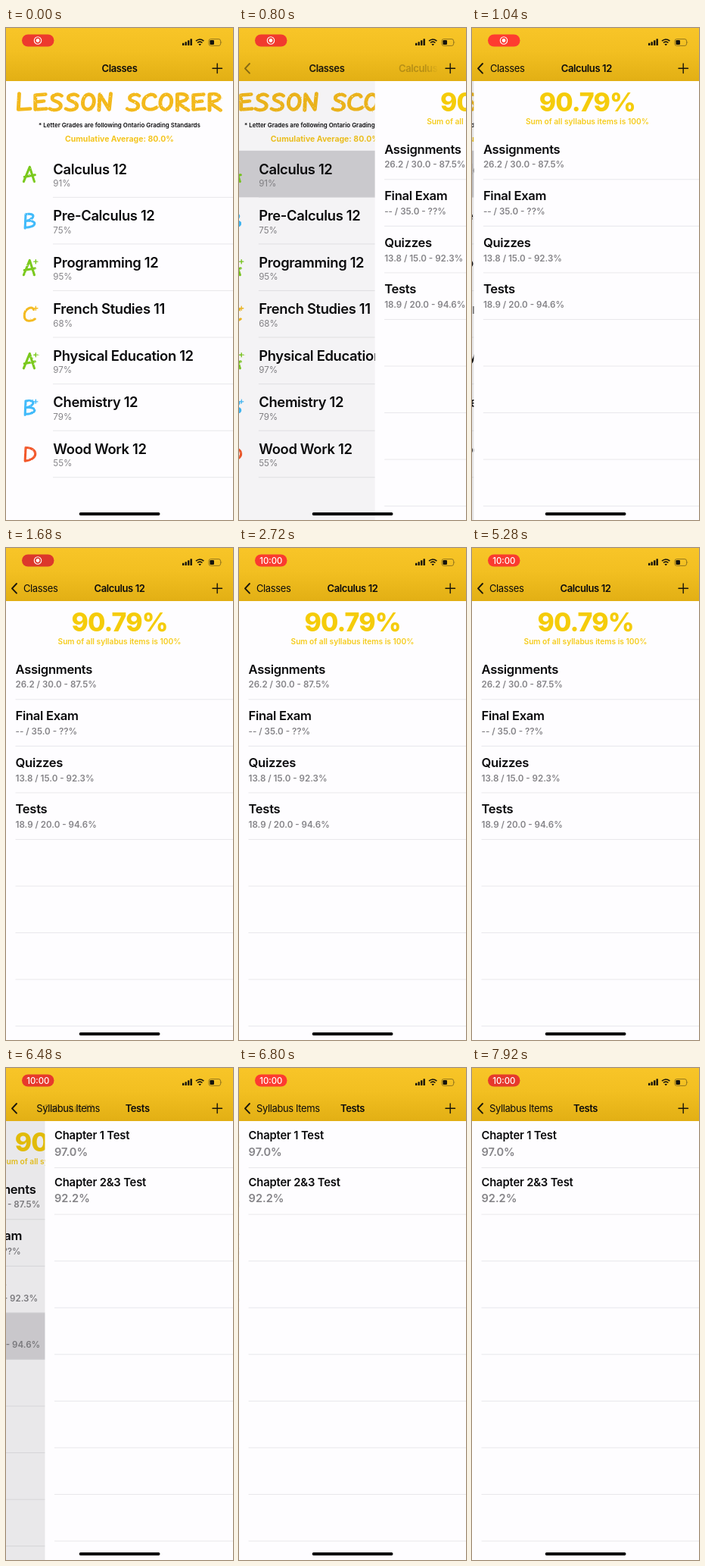
Animation, 300 px wide and 649 px high, one loop 8000 ms. Source, as an HTML page:

```html
<!DOCTYPE html>
<html lang="en">
<head>
<meta charset="utf-8">
<title>Classes</title>
<style>
html, body { margin: 0; width: 100%; height: 100%; overflow: hidden; background: #fefdff; }
svg { display: block; width: 100vw; height: 100vh; }
text { font-family: Inter, "Open Sans", sans-serif; fill: #0b0b0d; white-space: pre; }
.mid { text-anchor: middle; }
.nav { font-size: 13px; letter-spacing: -.03em; }
.bold { font-weight: 600; }
.class { font-size: 18.4px; font-weight: 600; letter-spacing: -.018em; }
.item { font-size: 16.6px; font-weight: 600; letter-spacing: -.018em; }
.test { font-size: 14.8px; font-weight: 600; letter-spacing: -.012em; }
.grade, .points, .score { fill: #858488; }
.grade { font-size: 11.6px; }
.points { font-size: 11.6px; font-weight: 600; }
.score { font-size: 14.6px; font-weight: 600; }
.note { font-size: 7.94px; font-weight: 600; }
.average { font-size: 10.5px; font-weight: 700; fill: #f4c51f; }
.total { font-size: 33.8px; font-weight: 800; letter-spacing: -.025em; fill: #f5cc0a; }
.sum { font-size: 10.2px; font-weight: 600; fill: #f5cc1c; }
.clock { font-size: 11.3px; font-weight: 500; fill: #fff; }
.line { stroke: #e3e2e6; stroke-width: .8; }
.paper { fill: #fefdff; }
.chosen { fill: #d2d1d5; }
.chalk { fill: none; stroke-linecap: round; stroke-linejoin: round; filter: url(#chalk); }
.ink { fill: none; stroke: #17150c; stroke-linecap: round; stroke-linejoin: round; }
</style>
</head>
<body>
<svg viewBox="0 0 300 649" preserveAspectRatio="none">
  <defs>
    <linearGradient id="gold" x2="0" y2="1">
      <stop offset="0" stop-color="#f8c528"/>
      <stop offset=".45" stop-color="#f2bf21"/>
      <stop offset="1" stop-color="#e2af14"/>
    </linearGradient>
    <linearGradient id="edge" gradientUnits="userSpaceOnUse" x1="246" x2="264">
      <stop stop-color="#fff"/>
      <stop offset="1" stop-color="#000"/>
    </linearGradient>
    <mask id="fade" maskUnits="userSpaceOnUse" x="0" y="0" width="300" height="70">
      <rect width="300" height="70" fill="url(#edge)"/>
    </mask>
    <filter id="chalk" x="-10%" y="-15%" width="120%" height="130%">
      <feTurbulence type="fractalNoise" baseFrequency=".4" numOctaves="2" seed="4" result="noise"/>
      <feColorMatrix in="noise" values="0 0 0 0 0  0 0 0 0 0  0 0 0 0 0  -5 0 0 0 4.4" result="grain"/>
      <feDisplacementMap in="SourceGraphic" in2="noise" scale="1.8" xChannelSelector="R" yChannelSelector="G" result="rough"/>
      <feComposite in="rough" in2="grain" operator="in"/>
    </filter>
  </defs>

  <g id="classes"></g>
  <g id="items"></g>
  <g id="tests"></g>

  <rect width="300" height="70" fill="url(#gold)"/>
  <g mask="url(#fade)">
    <text id="title1" class="nav bold mid" y="57.5">Classes</text>
    <text id="title2" class="nav bold mid" y="57.5">Calculus 12</text>
    <text id="title3" class="nav bold mid" y="57.5">Tests</text>
    <text id="back1" class="nav" y="57.5">Classes</text>
    <text id="back2" class="nav" y="57.5">Syllabus Items</text>
  </g>
  <path id="chevron" class="ink" stroke-width="1.9" d="M14 47L8 53.3L14 59.6"/>
  <path class="ink" stroke-width="1.4" d="M273 53.3H285.5M279.2 47V59.6"/>

  <rect id="pill" x="21" y="8.5" width="42.5" height="16" rx="8"/>
  <g id="record">
    <circle cx="42" cy="16.5" r="4.7" fill="none" stroke="#fff" stroke-width="1.1"/>
    <circle cx="42" cy="16.5" r="2.4" fill="#fff"/>
  </g>
  <text id="clock" class="clock mid" x="42.3" y="20.6">10:00</text>

  <g fill="#17150c">
    <rect x="233" y="19.8" width="2.4" height="3.2" rx=".6"/>
    <rect x="236.5" y="18.2" width="2.4" height="4.8" rx=".6"/>
    <rect x="240" y="16.2" width="2.4" height="6.8" rx=".6"/>
    <rect x="243.5" y="14.2" width="2.4" height="8.8" rx=".6"/>
    <path d="M254.4 21.4Q256.2 19.9 258 21.4L256.2 23.2Z"/>
    <rect x="269.4" y="16" width="5.6" height="6" rx="1.2"/>
  </g>
  <path class="ink" stroke-width="1.6" d="M251 17.2Q256.2 12.8 261.4 17.2M253 19.5Q256.2 16.8 259.4 19.5" style="stroke-linecap:butt"/>
  <rect x="268" y="14.6" width="15.6" height="8.8" rx="2.5" fill="none" stroke="#7d641b" stroke-width=".8"/>
  <path d="M284.6 17.4q1.4 1.6 0 3.2z" fill="#7d641b"/>
  <rect x="96.7" y="639" width="106.8" height="3.9" rx="1.95" fill="#000"/>
</svg>

<script>
const $ = id => document.getElementById(id);
const PITCH = 61.56;

const glyphs = {
  A: 'M1 24L10 2L17 24M2 17L18 14',
  B: 'M3 24L4 3C20 0 18 11 4 13C23 11 21 23 3 23',
  C: 'M16 6C14 0 2 4 2 15C2 25 13 24 18 20',
  D: 'M3 23L4 3C23 3 24 21 3 23',
  E: 'M16 3L4 4L4 23L17 22M4 13L14 12',
  L: 'M4 2L3 23L17 22',
  N: 'M3 24L4 3L15 23L17 2',
  O: 'M10 3C2 4 0 21 8 23C17 24 20 4 10 3',
  R: 'M4 24L4 3C15 1 19 7 13 11L4 14L17 24',
  S: 'M16 5C12 1 4 4 5 9C6 13 15 12 15 18C15 24 6 25 2 22',
  '+': 'M0 3H6M3 0V6'
};
const hues = { A: '#7ac91f', B: '#43bbfa', C: '#f4bb23', D: '#f2582c' };

const text = (cls, x, y, s) =>
  `<text class="${cls}" x="${x}" y="${y}">${s.replace('&', '&amp;')}</text>`;
const line = (x, y) => `<path class="line" d="M${x} ${y}H300"/>`;
const box = (cls, y, h, more = '') =>
  `<rect class="${cls}" y="${y}" width="300" height="${h}" ${more}/>`;
const glyph = (c, x, y, scale) =>
  `<path d="${glyphs[c]}" transform="translate(${x} ${y}) scale(${scale})"/>`;
const word = (s, x) => [...s].map((c, i) => glyph(c, x + i * 21.3, 84.5, '1.12 1')).join('');
const page = body => box('paper', 0, 649) + body + box('dim', 0, 649, 'opacity="0"');

function badge(mark, y) {
  const plus = mark[1] ? glyph('+', 36.8, y + 1, .85) : '';
  return `<g class="chalk" stroke="${hues[mark[0]]}" stroke-width="3.5">` +
    glyph(mark[0], 22.5, y, .88) + `<g stroke-width="1.6">${plus}</g></g>`;
}

const classes = [
  ['A', 'Calculus 12', '91%'], ['B', 'Pre-Calculus 12', '75%'],
  ['A+', 'Programming 12', '95%'], ['C+', 'French Studies 11', '68%'],
  ['A+', 'Physical Education 12', '97%'], ['B+', 'Chemistry 12', '79%'],
  ['D', 'Wood Work 12', '55%']
];
const items = [
  ['Assignments', '26.2 / 30.0 - 87.5%'], ['Final Exam', '-- / 35.0 - ??%'],
  ['Quizzes', '13.8 / 15.0 - 92.3%'], ['Tests', '18.9 / 20.0 - 94.6%']
];
const tests = [['Chapter 1 Test', '97.0%'], ['Chapter 2&3 Test', '92.2%']];

// Plain table: ruled lines down the page, text in the first rows
function table(rows, top, count, big, small, y1, y2) {
  let out = '';
  for (let i = 0; i < count; i++) {
    const y = top + i * PITCH;
    out += line(12.5, y + PITCH);
    if (rows[i]) out += text(big, 12.5, y + y1, rows[i][0]) + text(small, 12.5, y + y2, rows[i][1]);
  }
  return out;
}

$('classes').innerHTML = page(
  `<g class="chalk" stroke="#f3b91f" stroke-width="4.4">${word('LESSON', 13)}${word('SCORER', 158)}</g>` +
  text('note mid', 150, 130.5, '* Letter Grades are following Ontario Grading Standards') +
  text('average mid', 150, 150.2, 'Cumulative Average: 80.0%') +
  box('chosen', 161.8, PITCH, 'id="pick1"') +
  classes.map(([mark, name, grade], i) => {
    const y = 161.8 + i * PITCH;
    return badge(mark, y + 19.7) + text('class', 62.3, y + 30.7, name) +
      text('grade', 62.3, y + 47.2, grade) + line(62, y + PITCH);
  }).join('')
);
$('items').innerHTML = page(
  text('total mid', 150, 109.6, '90.79%') +
  text('sum mid', 150, 127.4, 'Sum of all syllabus items is 100%') +
  box('chosen', 138.2 + 3 * PITCH, PITCH, 'id="pick2"') +
  table(items, 138.2, 8, 'item', 'points', 27.5, 46.2)
);
$('tests').innerHTML = page(table(tests, 70, 9, 'test', 'score', 24.2, 45.6));

const clamp = v => Math.max(0, Math.min(1, v));
const show = (el, v) => el.setAttribute('opacity', clamp(v));
const slide = (id, x) => $(id).setAttribute('transform', `translate(${x} 0)`);

// Critically damped spring from 0 to 1
function spring(ms) {
  if (ms <= 0) return 0;
  if (ms > 600) return 1;
  const k = ms * .023;
  return 1 - (1 + k) * Math.exp(-k);
}

function label(id, x, opacity) {
  $(id).setAttribute('x', x);
  show($(id), opacity);
}

const LOOP = 8000, STEP = 80, PUSH1 = 740, PUSH2 = 6341;

function draw(t) {
  const p1 = spring(t - PUSH1), p2 = spring(t - PUSH2);
  const q1 = spring(t - PUSH1 - 10), q2 = spring(t - PUSH2 - 10);

  slide('classes', -90 * p1);
  slide('items', 300 * (1 - p1) - 90 * p2);
  slide('tests', 300 * (1 - p2));
  show($('classes').querySelector('.dim'), .1 * p1);
  show($('items').querySelector('.dim'), .1 * p2);
  show($('pick1'), t >= 640 ? 1 : 0);
  show($('pick2'), t >= 6240 ? .8 : 0);

  const enter = q => (q - .2) * 1.9;
  const leave = q => q < 1 ? 1.4 - 1.5 * q : 0;
  label('title1', 150 - 106.5 * q1, leave(q1));
  label('back1', 23 + 104 * (1 - q1) - 60 * q2, Math.min((q1 - .3) * 2, 1 - 2 * q2));
  label('title2', 150 + 139 * (1 - q1) - 85 * q2, Math.min(enter(q1), leave(q2)));
  label('back2', 23 + 85 * (1 - q2), (q2 - .3) * 2.1);
  label('title3', 150 + 116 * (1 - q2), enter(q2));
  show($('chevron'), q1 * 1.5);

  const glow = .5 + .5 * Math.cos((t - 1100) / 1450 * 2 * Math.PI);
  $('pill').setAttribute('fill', `rgb(${216 + 39 * glow} ${56 + 3 * glow} ${42 + 6 * glow})`);
  const timed = clamp((t - 1800) / 240);
  show($('record'), 1 - timed);
  show($('clock'), timed);
}

const start = performance.now();
function tick() {
  const t = (performance.now() - start) % LOOP;
  draw(t - t % STEP);
  requestAnimationFrame(tick);
}
tick();
</script>
</body>
</html>
```
